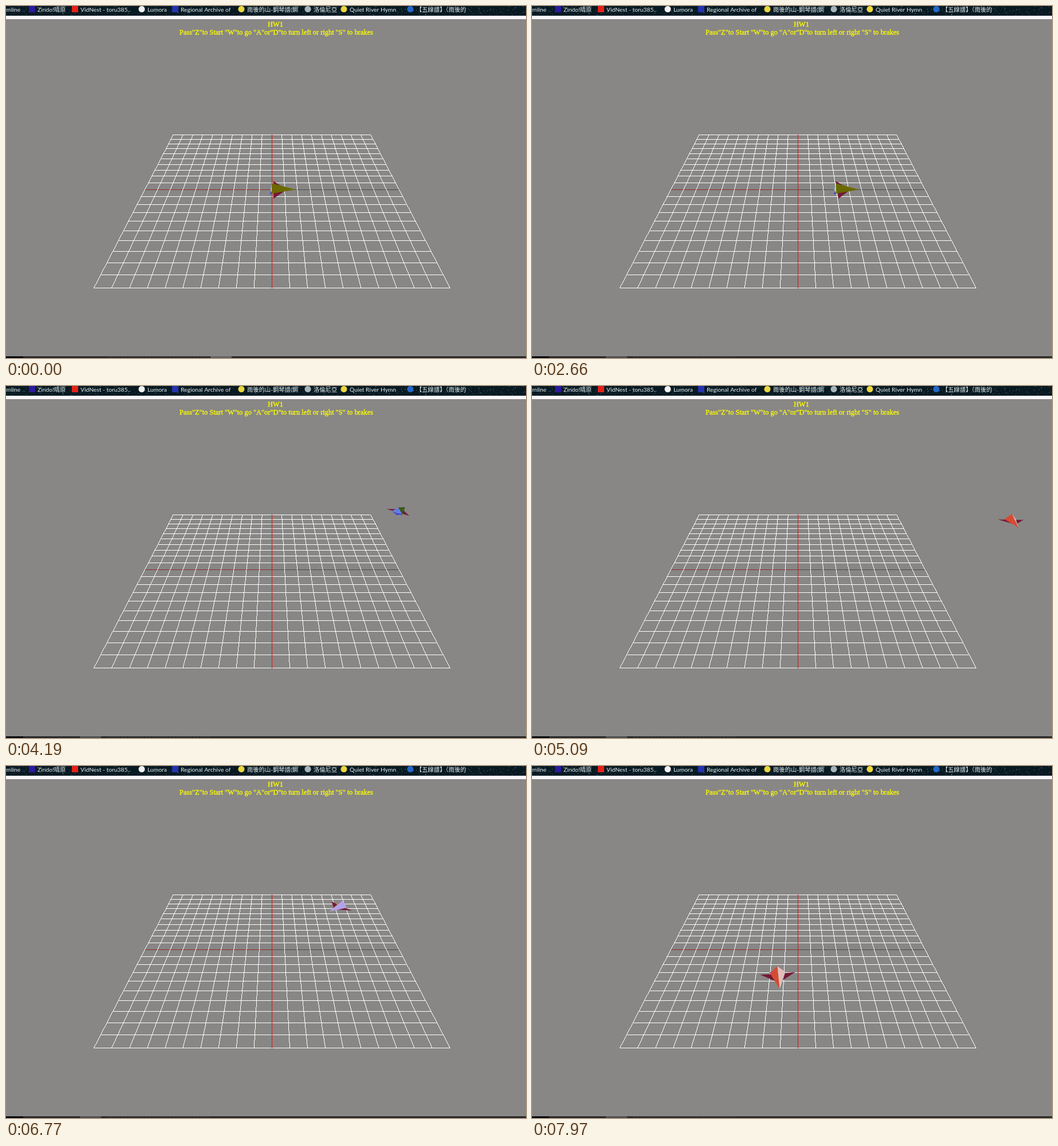
These frames come from a looping animation (908x616 px, 8 s). An HTML page with a canvas:

```html
<!DOCTYPE html>
<html lang="en">
<meta charset="utf-8">
<title>HW1</title>
<style>
  html, body { margin: 0; width: 100%; height: 100%; overflow: hidden; background: #888786; }
  canvas { display: block; }
</style>
<canvas id="stage" width="908" height="616"></canvas>
<script>
const g = document.getElementById('stage').getContext('2d');

// Camera looking at the grid centre, pitched down by atan(2/3)
const SIN = 2 / Math.sqrt(13), COS = 3 / Math.sqrt(13);
const DIST = 29, FOCAL = 643.5, CX = 464.4, CY = 321.2;

function project([x, y, z]) {
  const k = FOCAL / (DIST - z * COS - y * SIN);
  return [CX + x * k, CY + (z * SIN - y * COS) * k];
}

function rect(color, x, y, w, h) {
  g.fillStyle = color;
  g.fillRect(x, y, w, h);
}

// Turning points on the ground: seconds, x, z, heading in degrees
const turns = [
  [1.79, 0, 0, 0], [2.57, 2.3, 0, 0], [3.32, 9.75, -2.3, -63],
  [3.75, 10.25, -7.4, -93], [4.2, 12.9, -10.6, -50], [5.09, 21, -9, 92],
  [5.45, 19.1, -6, 165], [6.14, 12.7, -9.6, 195], [7.34, 2.1, -2.9, 136],
  [7.97, -1.46, 3, 83]
];

// The ship speeds up steadily, then cruises
const speed = s => Math.min(11, 7.6 * (s - turns[0][0]));

// Cubic path between turns; the nose follows the direction of travel
function pose(s) {
  s = Math.max(s, turns[0][0]);
  const i = Math.max(1, turns.findIndex(p => p[0] >= s));
  const a = turns[i - 1], b = turns[i], span = b[0] - a[0], u = (s - a[0]) / span;
  const axis = (c, trig) => {
    const va = span * speed(a[0]) * trig(a[3] * Math.PI / 180);
    const vb = span * speed(b[0]) * trig(b[3] * Math.PI / 180);
    const d = b[c] - a[c], q = 3 * d - 2 * va - vb, r = va + vb - 2 * d;
    return [a[c] + u * (va + u * (q + u * r)), va + u * (2 * q + 3 * u * r)];
  };
  const [x, dx] = axis(1, Math.cos), [z, dz] = axis(2, Math.sin);
  return [x, z, Math.atan2(dz, dx)];
}

// Ship points: forward, up, right
const N = [1.85, 0, 0], T = [0, 0.58, 0], L = [0, 0, -0.56], R = [0, 0, 0.56];
const B = [0, -0.25, 0], K = [-0.1, 0, 0];

function drawShip(seconds) {
  const [x, z, heading] = pose(seconds);
  const c = Math.cos(heading), s = Math.sin(heading), s2 = s * s, s4 = s2 * s2;
  const face = (color, points, cull = true) => {
    const [p, q, r] = points.map(([f, u, w]) => project([x + f * c - w * s, u, z + f * s + w * c]));
    if (cull && (q[0] - p[0]) * (r[1] - p[1]) <= (q[1] - p[1]) * (r[0] - p[0])) return;
    g.fillStyle = color;
    g.beginPath();
    [p, q, r].forEach(v => g.lineTo(...v));
    g.fill();
  };
  const blue = '#3e3edc';
  const back = `rgb(${156 - 100 * s2}, ${212 - 150 * s2}, 224)`;
  for (const side of [-1, 1])
    face('#741a38', [[0.1, 0, 1.25 * side], [1, 0, 0.2 * side], [0.15, 0, 0]], false);
  face(blue, [[0, 0, 0.1], R, [-0.2, -0.05, 0.6]], false);
  face(back, [K, T, R]);
  face(blue, [K, R, B]);
  face(blue, [K, B, L]);
  face(back, [K, L, T]);
  face('#6b6900', [N, B, R]);
  face('#8c8a10', [N, L, B]);
  // Upper sides are tinted by how far they turn to the viewer
  face(`rgb(${107 + 80 * s + 27 * s2}, ${105 - 30 * s2}, ${50 * s2})`, [N, R, T]);
  face(`rgb(${85 + 140 * s}, ${156 + 35 * s4}, ${240 - 56 * s4})`, [N, T, L]);
}

// Hard-edged lines, one pixel per row
function drawGrid() {
  for (let i = -10; i <= 10; i++) {
    const [x0, y] = project([-10, 0, i]).map(Math.floor), x1 = project([10, 0, i])[0];
    rect(i ? '#fff' : '#4a4a4a', x0, y, Math.floor(x1) - x0 + 1, 1);
    if (!i) rect('#8c2c2c', x0, y, CX - x0, 1);
  }
  for (let i = -10; i <= 10; i++) {
    const a = project([i, 0, -10]), b = project([i, 0, 10]);
    const slope = (b[0] - a[0]) / (b[1] - a[1]);
    for (let y = Math.floor(a[1]); y <= b[1]; y++)
      rect(i ? '#fff' : '#e01010', Math.floor(a[0] + (y + 0.5 - a[1]) * slope), y, 1, 1);
  }
}

// Label, its left edge, icon colour, round icon
const bookmarks = [
  ['rmline', -3],
  ['Zindo!晴原', 55, '#2c1a9c'],
  ['VidNest - toru385..', 130, '#e62117'],
  ['Lumora', 247, '#f2f2f2', true],
  ['Regional Archive of', 305, '#2434b0'],
  ['雨後的山-鋼琴譜(鋼', 421, '#ecd83c', true],
  ['洛倫尼亞', 537, '#a8b4b8', true],
  ['Quiet River Hymn', 600, '#ecd83c', true],
  ['【五線譜】（雨後的', 716, '#2468c8', true]
];

function drawBar() {
  rect('#081922', 0, 0, 908, 17);
  let seed = 7;
  const random = () => (seed = seed * 16807 % 2147483647) / 2147483647;
  for (let i = 0; i < 900; i++) {
    g.globalAlpha = 0.15 + random() * 0.6;
    rect(random() < 0.2 ? '#a8ccd4' : '#346070', Math.floor(random() * 908), Math.floor(random() * 16), 1, 1);
  }
  g.globalAlpha = 1;
  rect('#fdf8fb', 0, 17, 908, 6);
  g.font = '10.3px Lato, "Noto Sans CJK TC", "Noto Sans CJK", sans-serif';
  g.textAlign = 'left';
  for (const [label, x, color, round] of bookmarks) {
    if (color) {
      g.fillStyle = color;
      g.beginPath();
      if (round) g.arc(x - 10, 5.5, 5.5, 0, 7);
      else g.rect(x - 15, 0, 11, 11);
      g.fill();
    }
    g.fillStyle = '#e4eef0';
    g.fillText(label, x, 9.5);
  }
}

function drawTitle() {
  g.fillStyle = g.strokeStyle = '#ff0';
  g.lineWidth = 0.3;
  g.font = '12.4px "Liberation Serif", serif';
  g.textAlign = 'center';
  const write = (text, x, y) => {
    g.fillText(text, x, y);
    g.strokeText(text, x, y);
  };
  write('HW1', 470.5, 35.5);
  write('Pass"Z"to Start "W"to go "A"or"D"to turn left or right "S" to brakes', 472, 49.5);
}

function drawTaskbar(t) {
  rect('#282828', 0, 613, 908, 3);
  rect('#080a0e', 0, 613, 30, 3);
  if (t < 530) rect('#626262', 357, 613, 37, 3);
  else if (t >= 560) rect('#505050', 129, 613, 37, 3);
  for (let x = 177; x < 357; x += 6) rect('#3c3c3c', x, 614, 4, 1);
}

function frame() {
  const now = performance.now() % 8000;
  const t = now < 500 ? 0 : 500 + Math.floor((now - 500) / 30) * 30;
  rect('#888786', 0, 0, 908, 616);
  drawBar();
  drawTitle();
  drawGrid();
  drawShip(t / 1000);
  drawTaskbar(t);
  requestAnimationFrame(frame);
}
frame();
</script>
</html>
```
